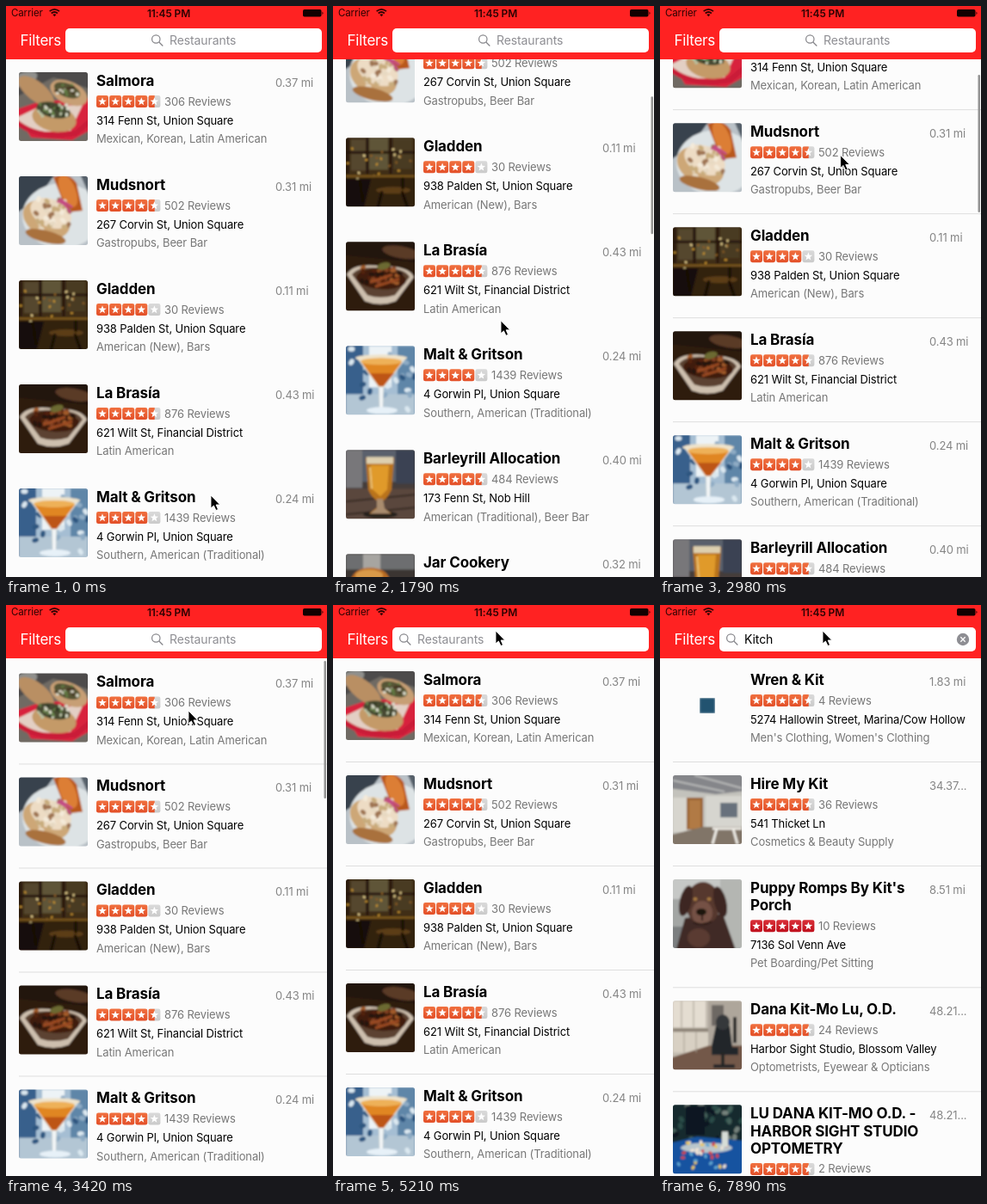
An HTML page that plays this animation: 373 by 664 pixels, repeating every 8000 ms.

```html
<!DOCTYPE html>
<html lang="en">
<head>
<meta charset="utf-8">
<title>Restaurant search</title>
<style>
html, body { margin: 0; width: 100%; height: 100%; overflow: hidden; background: #fcfcfc; }
svg { display: block; width: 100vw; height: 100vh; }
text { font: 13px Inter, Roboto, sans-serif; letter-spacing: -.12px; fill: #777; white-space: pre; }
.title { font-size: 17px; font-weight: 700; letter-spacing: -.13px; fill: #000; }
.address, .typed { fill: #000; }
.far { fill: #858585; }
.field { font-size: 14px; letter-spacing: -.1px; }
.hint { fill: #8e8e93; }
.status { font-size: 11.5px; fill: #2c0303; }
.clock { font-size: 12px; font-weight: 600; text-anchor: middle; }
.nav { font-size: 17px; letter-spacing: -.25px; fill: #fff; }
</style>
</head>
<body>
<svg viewBox="0 0 373 664" preserveAspectRatio="none">
  <defs>
    <clipPath id="thumb"><rect width="80" height="80" rx="2.5"/></clipPath>
    <clipPath id="half"><rect width="7.3" height="14"/></clipPath>
    <filter id="soft" x="0" y="0" width="1" height="1"><feGaussianBlur stdDeviation="1"/></filter>
    <linearGradient id="orange" x2="0" y2="1"><stop stop-color="#f0703f"/><stop offset="1" stop-color="#e34f28"/></linearGradient>
    <linearGradient id="red" x2="0" y2="1"><stop stop-color="#d93038"/><stop offset="1" stop-color="#bf0f1c"/></linearGradient>
    <linearGradient id="grey" x2="0" y2="1"><stop stop-color="#dadada"/><stop offset="1" stop-color="#cacaca"/></linearGradient>
  </defs>
  <rect width="373" height="664" fill="#fcfcfc"/>
  <g id="places"></g>
  <g id="matches"></g>
  <rect id="bar" x="369.5" width="2.5" height="160" rx="1.2" fill="#939393"/>
  <rect width="373" height="62" fill="#ff2222"/>
  <text class="status" x="6" y="12">Carrier</text>
  <g fill="none" stroke="#2c0303" stroke-width="1.7">
    <path d="M50.6 6.2Q56.3 1.4 62 6.2M52.7 8.5Q56.3 5.500 59.900 8.500"/>
    <path d="M54.3 10L56.3 12.3L58.3 10Q56.3 8.5 54.3 10Z" fill="#2c0303" stroke="none"/>
  </g>
  <text class="status clock" x="189" y="12.5">11:45 PM</text>
  <rect x="345" y="4" width="21.5" height="8.5" rx="1.8" fill="#120000"/>
  <path d="M367.5 6.5q2 1.8 0 3.6z" fill="#120000"/>
  <text class="nav" x="16.5" y="46">Filters</text>
  <rect x="69" y="26" width="298" height="28" rx="5" fill="#fff"/>
  <g id="hint">
    <g fill="none" stroke="#85858a" stroke-width="1.2">
      <circle cx="174.3" cy="38.5" r="4.7"/><path d="M177.8 42L182.3 46.5"/>
    </g>
    <text id="placeholder" class="field hint" x="190" y="45">Restaurants</text>
  </g>
  <text id="typed" class="field typed" x="98" y="45"></text>
  <g id="clear">
    <circle cx="352" cy="40" r="7.2" fill="#8e8e93"/>
    <path d="M349.3 37.3l5.4 5.4m0-5.4l-5.4 5.4" stroke="#fff" stroke-width="1.3"/>
  </g>
  <path id="cursor" d="M0 0V15L3.4 12L6 17.5L8.5 16.4L6.100 11H10.700Z" fill="#000" stroke="#fff" stroke-width=".9"/>
</svg>
<script>
const LOOP = 8000, STEP = 148.7, ROW = 121, LINE = 20.3, TOP = 62;
const el = id => document.getElementById(id);

// Drawing helpers for the thumbnails, in an 80 by 80 box.
const box = (x, y, w, h, fill) => `<rect x="${x}" y="${y}" width="${w}" height="${h}" fill="${fill}"/>`;
const oval = (x, y, rx, ry, fill, turn = 0) =>
  `<ellipse cx="${x}" cy="${y}" rx="${rx}" ry="${ry}" fill="${fill}" transform="rotate(${turn} ${x} ${y})"/>`;
const shape = (d, fill) => `<path d="${d}" fill="${fill}"/>`;
const line = (d, color, width) => `<path d="${d}" fill="none" stroke="${color}" stroke-width="${width}"/>`;
const base = fill => box(-5, -5, 90, 90, fill);
const noise = n => { const v = Math.sin(n * 127.1) * 43758.5; return v - Math.floor(v); };
const specks = (count, seed, x, y, w, h, size, colors) => Array.from({ length: count }, (_, i) =>
  oval(x + noise(seed + i) * w, y + noise(seed + i + 50) * h, size, size * .7,
    colors[i % colors.length], i * 40)).join('');

const photos = {
  tacos: base('#6f6a63') + shape('M-5-5H85V20L40 6L-5 30Z', '#4d4c4b') + oval(6, 8, 16, 8, '#8f8f8c', -20) +
    shape('M-5 44L24 34L85 30V66L62 79L14 76Z', '#d8243e') + shape('M-5 54L24 40L74 38L60 68L14 70Z', '#e3cfc4') +
    oval(20, 22, 25, 11, '#b98f63', 38) + oval(58, 24, 23, 13, '#c79f74', 25) + oval(41, 54, 26, 15, '#c49a68', 12) +
    oval(40, 44, 20, 9, '#464a30', 12) + oval(56, 21, 16, 8, '#575536', 22) +
    specks(34, 4, 22, 37, 36, 14, 2.2, ['#dcdccb', '#66804a', '#2d3521', '#b9c3a4']) +
    specks(20, 9, 42, 14, 28, 13, 2, ['#dedacb', '#617b43', '#443223']) + line('M-5 56Q20 79 66 71L85 55', '#c91d38', 6),
  bun: base('#b9c1c7') + shape('M-5-5H44L20 28L-5 44Z', '#39434d') + oval(50, 46, 46, 38, '#dde3e5') +
    shape('M40 1Q58-6 67 8L74 40L56 42Z', '#b9581e') + oval(57, 17, 9, 20, '#dc7e34', -22) +
    shape('M70-5H85V30Z', '#56606a') + oval(32, 50, 29, 20, '#cda777', 28) + oval(37, 43, 25, 16, '#eddcc4', 25) +
    specks(34, 21, 20, 26, 40, 35, 3.6, ['#f4ead9', '#c8ac7d', '#e7d9c2', '#9f7452']) +
    line('M44 29Q54 30 60 43M47 26L62 36', '#c44885', 2.5) + oval(31, 70, 24, 7, '#a9713c', 14),
  room: base('#30200f') + box(0, 0, 80, 42, '#412d18') + box(6, 2, 17, 36, '#54472f') + box(27, 0, 22, 37, '#5f5439') +
    box(55, 0, 22, 36, '#4a3a23') + line('M2 0V42M25 0V42M52 0V42M0 17H80', '#25190d', 3) +
    specks(22, 31, 2, 12, 76, 36, 1.7, ['#c79331', '#efd894', '#8a5d24']) + box(0, 43, 80, 3, '#74521f') +
    shape('M0 48H29L21 80H0Z', '#181008') + oval(55, 61, 20, 4, '#5c3c18') +
    line('M42 62L37 82M65 62L72 82M16 49L20 75M66 46V60', '#130c06', 3),
  plate: base('#2f1b10') + shape('M-5-5H85V24L-5 15Z', '#24140d') + oval(64, 12, 22, 7, '#5a3a27', 10) +
    shape('M1 38Q8 24 40 28Q74 28 79 41L58 69Q40 76 22 69Z', '#cdbfae') +
    shape('M7 38Q14 28 40 30Q69 30 74 41L57 62Q40 67 25 62Z', '#5c4230') + oval(41, 43, 29, 12, '#3f1f10', 4) +
    specks(30, 43, 16, 29, 48, 22, 3.5, ['#824020', '#53200f', '#a35c2a', '#281309']) +
    line('M28 47L54 38M34 52L62 43', '#9a4a22', 3) + oval(44, 28, 8, 4, '#6c6a32', -15),
  martini: base('#a5bed3') + box(-5, -5, 25, 90, '#39618c') + box(27, 0, 26, 48, '#edf3f6') + box(60, 0, 25, 80, '#5f86a8') +
    box(0, 56, 80, 29, '#b3c6d4') + specks(26, 60, 0, 0, 80, 78, 4, ['#dbe8f0', '#2f5680', '#8eabc4']) +
    shape('M12 13L38 49L39 73H43L44 49L71 13Z', '#dfe3df') + shape('M18 19H65L44 47H38Z', '#e08620') +
    shape('M28 32H56L43 47H39Z', '#bd5514') + oval(41, 14, 30, 4, '#efe3ca') + oval(41, 18, 24, 4, '#eeb158') +
    line('M41 48V72', '#f5f8fa', 3) + oval(42, 75, 18, 4, '#e7f1f8'),
  beer: base('#443c3b') + box(0, 0, 80, 37, '#5a616c') + box(0, 0, 19, 44, '#78777a') + box(58, 0, 22, 39, '#3a4352') +
    shape('M-5 45H85V85H-5Z', '#5a473e') + line('M0 60L80 52M0 75L80 67', '#382a24', 2) + oval(40, 75, 20, 4, '#26201e') +
    shape('M23 9H56L53 46Q48 57 43 59V67L53 74H27L36 67V59Q29 54 26 46Z', '#b9731d') +
    shape('M29 18H50L48 46L40 54L31 46Z', '#e09a2c') + box(24, 8, 31, 8, '#ddcfaf') +
    shape('M36 57H43L45 68L52 74H28L36 68Z', '#a98c6e') + line('M28 20L30 45', '#f0c878', 2),
  burger: base('#3a3431') + box(0, 0, 80, 18, '#6d6e70') + box(20, 0, 20, 18, '#a7a5a1') + box(0, 62, 80, 18, '#c4b8a3') +
    line('M43 53L73 39M50 66L77 47M45 60L80 61M57 71L69 41M44 70L74 72', '#d99c35', 6) +
    shape('M4 38Q6 15 30 16Q52 17 52 38Z', '#b76b24') + oval(27, 25, 16, 7, '#d99a49') +
    box(4, 38, 49, 5, '#718339') + box(6, 43, 46, 9, '#4b2112') + shape('M4 50H53L42 57L32 52L19 57Z', '#f0b638') +
    shape('M6 56H51L47 72H10Z', '#bd7c37'),
  logo: '<rect x="31" y="31" width="18" height="18" fill="#24536f"/>',
  door: base('#c3c2bc') + shape('M-5-5H85V18L50 22L-5 15Z', '#85868a') + line('M0 6L60 19M25 0L80 15', '#b7b8b7', 2) +
    box(0, 26, 16, 40, '#d7d5ce') + box(16, 26, 19, 37, '#9b6536') + box(19, 29, 13, 33, '#b17a45') +
    box(38, 24, 42, 38, '#d6d5cf') + box(55, 32, 20, 17, '#68717c') + shape('M-5 70L35 60H85V85H-5Z', '#817568') +
    line('M46 62H80M51 62L46 80M70 62L75 80', '#eceae4', 3),
  dog: base('#a3a6a4') + box(-5, -5, 90, 28, '#c6c8c6') + box(55, 0, 30, 80, '#b4b6b2') + box(-5, 55, 20, 30, '#7b7f80') +
    shape('M3 85L14 45L58 40L74 85Z', '#3f2a25') + oval(35, 28, 20, 25, '#56382f') +
    oval(15, 25, 7, 18, '#3d2621', 14) + oval(55, 26, 7, 18, '#3d2621', -14) + oval(34, 39, 12, 14, '#745145') +
    oval(33, 38, 6, 4, '#1b1211') + oval(26, 23, 2.5, 2, '#a87a42') + oval(42, 23, 2.5, 2, '#a87a42') +
    line('M34 42V48M24 50Q34 55 45 49', '#2d1b17', 2) + oval(30, 68, 13, 11, '#5a3b31'),
  clinic: base('#c3bcb0') + box(0, 0, 38, 31, '#e4ddd1') + box(0, 36, 41, 24, '#d8d0c3') + box(0, 32, 42, 4, '#8d8377') +
    box(41, 0, 39, 52, '#aea69b') + box(45, 5, 14, 24, '#6d6863') + shape('M-5 67L42 52H85V85H-5Z', '#73594a') +
    shape('M50 29H66L69 54H76V63H45V52Z', '#242629') + oval(58, 25, 8, 9, '#35373a') +
    line('M58 60V75M47 76H72M72 19V49', '#252528', 4) + line('M10 0V31M24 0V31M13 36V60M27 36V60', '#a69d91', 1),
  display: base('#17292f') + specks(34, 77, 0, 0, 80, 40, 4, ['#294b47', '#0d1720', '#44615a', '#74817b']) +
    box(15, 1, 22, 34, '#0e1520') + shape('M-5 45L28 37L85 42V85H-5Z', '#1553a0') + oval(39, 50, 30, 6, '#b9c6cc') +
    specks(30, 88, 4, 43, 70, 30, 2.6, ['#f0e3d6', '#d0464d', '#5fa5d0', '#e8c75f']) + box(57, 31, 7, 18, '#d7ddd7')
};

const places = [
  ['Salmora', '0.37 mi', 4.5, 306, '314 Fenn St, Union Square', 'Mexican, Korean, Latin American', 'tacos'],
  ['Mudsnort', '0.31 mi', 4.5, 502, '267 Corvin St, Union Square', 'Gastropubs, Beer Bar', 'bun'],
  ['Gladden', '0.11 mi', 4, 30, '938 Palden St, Union Square', 'American (New), Bars', 'room'],
  ['La Brasía', '0.43 mi', 4.5, 876, '621 Wilt St, Financial District', 'Latin American', 'plate'],
  ['Malt &amp; Gritson', '0.24 mi', 4, 1439, '4 Gorwin Pl, Union Square', 'Southern, American (Traditional)', 'martini'],
  ['Barleyrill Allocation', '0.40 mi', 4.5, 484, '173 Fenn St, Nob Hill', 'American (Traditional), Beer Bar', 'beer'],
  ['Jar Cookery', '0.32 mi', 4.5, 419, '296 Delora St, SoMa', 'Food Stands, Burgers', 'burger']
];
const matches = [
  ['Wren &amp; Kit', '1.83 mi', 4.5, 4, '5274 Hallowin Street, Marina/Cow Hollow', "Men's Clothing, Women's Clothing", 'logo'],
  ['Hire My Kit', '34.37...', 4.5, 36, '541 Thicket Ln', 'Cosmetics &amp; Beauty Supply', 'door'],
  ["Puppy Romps By Kit's|Porch", '8.51 mi', 5, 10, '7136 Sol Venn Ave', 'Pet Boarding/Pet Sitting', 'dog'],
  ['Dana Kit-Mo Lu, O.D.', '48.21...', 4.5, 24, 'Harbor Sight Studio, Blossom Valley', 'Optometrists, Eyewear &amp; Opticians', 'clinic'],
  ['LU DANA KIT-MO O.D. -|HARBOR SIGHT STUDIO|OPTOMETRY', '48.21...', 4.5, 2, 'Harbor Sight Studio', 'Optometrists', 'display']
];

const starPoints = Array.from({ length: 10 }, (_, i) => {
  const a = i * Math.PI / 5, r = i % 2 ? 2.1 : 5;
  return `${7 + r * Math.sin(a)},${7.2 - r * Math.cos(a)}`;
}).join(' ');

function stars(score) {
  const color = score === 5 ? 'red' : 'orange';
  const tile = (fill, clip = '') => `<rect width="14" height="14" rx="2.3" fill="url(#${fill})" ${clip}/>`;
  return Array.from({ length: 5 }, (_, i) => {
    const part = score - i;
    const fill = part >= 1 ? tile(color)
      : tile('grey') + (part > 0 ? tile(color, 'clip-path="url(#half)"') : '');
    return `<g transform="translate(${105 + i * 15.1} 0)">${fill}<polygon points="${starPoints}" fill="#fff"/></g>`;
  }).join('');
}

function list(rows) {
  let y = TOP;
  return rows.map(([name, far, score, count, address, kind, photo]) => {
    const lines = name.split('|'), extra = (lines.length - 1) * LINE, top = y;
    const label = (cls, x, at, text) => `<text class="${cls}" x="${x}" y="${at}">${text}</text>`;
    y += ROW + extra;
    return `<g transform="translate(0 ${top})">
      <g transform="translate(15 15)" clip-path="url(#thumb)"><g filter="url(#soft)">${photos[photo]}</g></g>
      ${lines.map((text, i) => label('title', 105, 31 + i * LINE, text)).join('')}
      ${label('far', 313, 31.5, far)}
      <g transform="translate(0 ${extra})">
        <g transform="translate(0 42)">${stars(score)}</g>
        ${label('count', 184, 53.6, count + ' Reviews')}
        ${label('address', 105, 76, address)}
        ${label('kind', 105, 97.2, kind)}
        <path class="rule" d="M15 120.5H373" stroke="#dedede"/>
      </g></g>`;
  }).join('');
}

el('places').innerHTML = list(places);
el('matches').innerHTML = list(matches);
const rules = el('places').querySelectorAll('.rule');

// Keys are [time, ...values], joined by straight lines.
function track(keys, t) {
  const next = keys.findIndex(k => k[0] > t);
  if (next < 0) return keys[keys.length - 1].slice(1);
  if (next === 0) return keys[0].slice(1);
  const a = keys[next - 1], b = keys[next], p = (t - a[0]) / (b[0] - a[0]);
  return a.slice(1).map((v, i) => v + (b[i + 1] - v) * p);
}

const pointer = [[150, 238, 569], [743, 190, 378], [1045, 190, 378], [1784, 195, 366], [2379, 206.5, 241],
  [3420, 212, 123], [4015, 211, 41], [4910, 211, 41], [5204, 189, 30]];
const scroll = [[1045, 0], [1190, 12], [1487, 90], [1784, 165.5], [2082, 212], [2379, 226], [2528, 216],
  [2974, 62], [3122, 14], [3271, -9], [3420, -2.5], [3569, -.5], [3718, 0]];
const barFade = [[1045, 0], [1190, 1], [3569, 1], [3866, 0]];
const hintShift = [[4164, 0], [4312, -28], [4461, -72], [4610, -92]];
const typing = [[6950, 'K'], [7130, 'Ki'], [7280, 'Kit'], [7580, 'Kitc'], [7870, 'Kitch']];

function draw() {
  const t = Math.floor((performance.now() % LOOP + 3) / STEP) * STEP + .5;
  const [x, y] = track(pointer, t), [offset] = track(scroll, t), [shift] = track(hintShift, t);
  const typed = typing.reduce((text, [at, next]) => t >= at ? next : text, '');
  const found = t > 7720;

  el('cursor').setAttribute('transform', `translate(${x} ${y})`);
  el('places').setAttribute('transform', `translate(0 ${-offset})`);
  el('bar').setAttribute('y', 65 + Math.max(offset, 0) * .243);
  el('bar').setAttribute('opacity', track(barFade, t)[0]);
  el('hint').setAttribute('transform', `translate(${shift} 0)`);
  el('typed').textContent = typed;
  el('placeholder').style.display = typed ? 'none' : '';
  el('clear').style.display = typed ? '' : 'none';
  el('places').style.display = found ? 'none' : '';
  el('matches').style.display = found ? '' : 'none';
  rules.forEach(rule => { rule.style.display = t > 1900 ? '' : 'none'; });
  requestAnimationFrame(draw);
}
draw();
</script>
</body>
</html>
```
